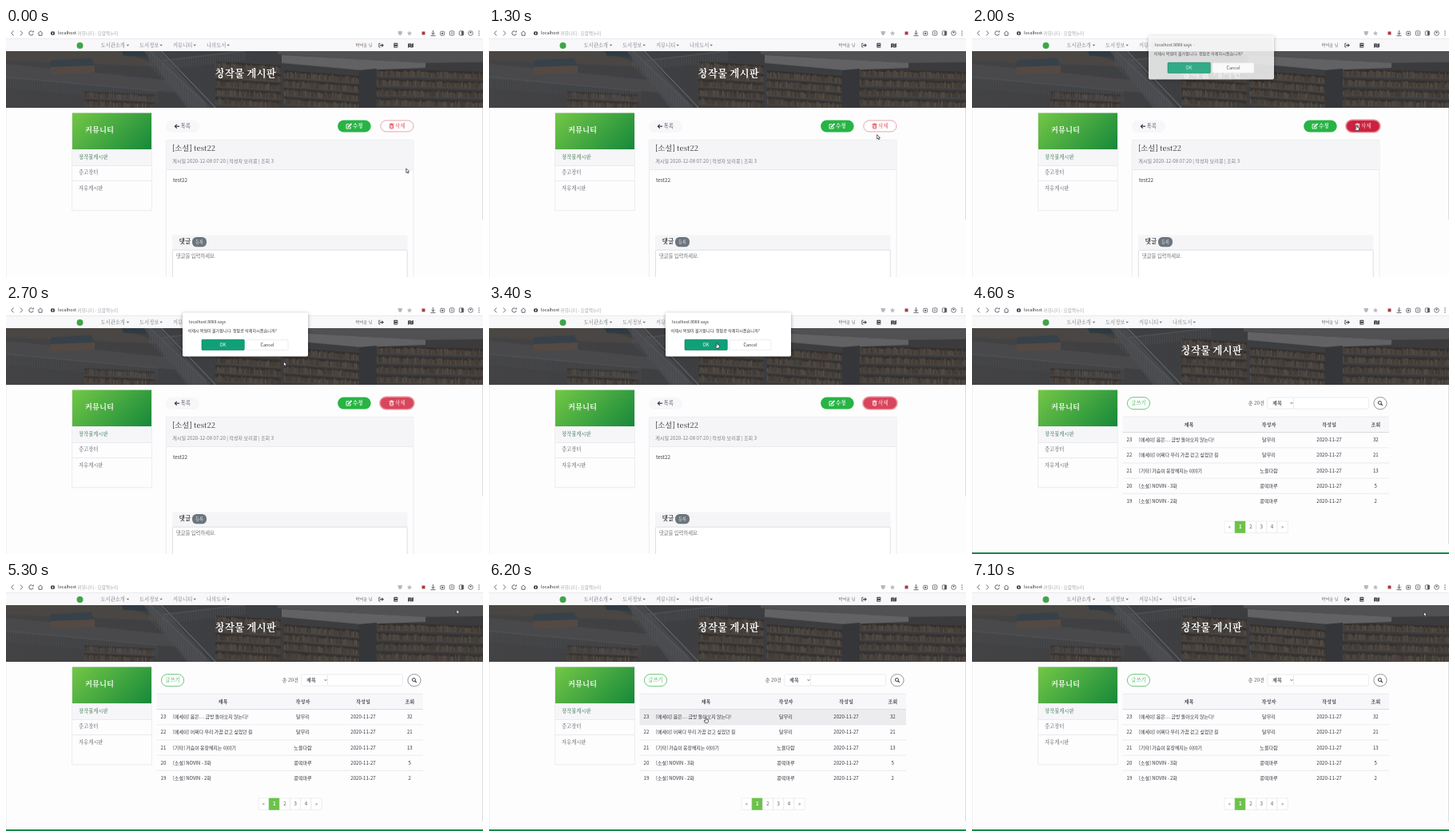
An HTML page with a canvas that plays this animation: 597 by 312 pixels, repeating every 7.2 s.

```html
<!DOCTYPE html>
<html lang="ko">
<head>
<meta charset="utf-8">
<title>커뮤니티</title>
<style>
html, body { margin: 0; width: 100%; height: 100%; overflow: hidden; background: #fff; }
canvas { display: block; width: 597px; height: 312px; }
</style>
</head>
<body>
<canvas id="stage" width="597" height="312"></canvas>
<script>
const W = 597, H = 312, LOOP = 7200, STEP = 100;
const SANS = '"Noto Sans CJK KR", "Noto Sans", sans-serif';
const SERIF = '"Noto Serif CJK KR", "Noto Serif", "Noto Sans CJK KR", serif';
const RED = '#dc3545', GREEN = '#28b445', LINE = '#e5e7ea', INK = '#30343a', PAGE = '#fdfdfe';
const screen = document.getElementById('stage').getContext('2d');
let c = screen;

// Drawing helpers
function rect(x, y, w, h, fill) {
  c.fillStyle = fill;
  c.fillRect(x, y, w, h);
}

function box(x, y, w, h, r, fill, stroke, lw = 0.8) {
  c.beginPath();
  c.roundRect(x, y, w, h, r);
  if (fill) { c.fillStyle = fill; c.fill(); }
  if (stroke) { c.strokeStyle = stroke; c.lineWidth = lw; c.stroke(); }
}

function path(points, stroke, lw = 0.9, fill) {
  c.beginPath();
  points.forEach(([x, y], i) => i ? c.lineTo(x, y) : c.moveTo(x, y));
  if (fill) { c.closePath(); c.fillStyle = fill; c.fill(); }
  if (stroke) { c.strokeStyle = stroke; c.lineWidth = lw; c.stroke(); }
}

const shape = (fill, ...points) => path(points, null, 0, fill);

function ring(x, y, r, stroke, lw = 0.9, from = 0, to = Math.PI * 2) {
  c.beginPath();
  c.arc(x, y, r, from, to);
  c.strokeStyle = stroke;
  c.lineWidth = lw;
  c.stroke();
}

function dot(x, y, r, fill) {
  c.beginPath();
  c.arc(x, y, r, 0, Math.PI * 2);
  c.fillStyle = fill;
  c.fill();
}

// y is the optical middle of the line
function text(s, x, y, size, color = INK, { font = SANS, align = 'left', weight = 400 } = {}) {
  c.font = `${weight} ${size}px ${font}`;
  c.textAlign = align;
  c.fillStyle = color;
  c.fillText(s, x, y + size * 0.36);
}

const serif = (s, x, y, size, color, opt = {}) => text(s, x, y, size, color, { font: SERIF, weight: 500, ...opt });
const mid = (s, x, y, size, color, opt = {}) => text(s, x, y, size, color, { align: 'center', ...opt });

function random(seed) {
  return () => (seed = (seed * 16807) % 2147483647) / 2147483647;
}

// Dimmed library hall behind the page title
function paintHero() {
  const rnd = random(77);
  const g = c.createLinearGradient(0, 0, W, 0);
  g.addColorStop(0, '#434345');
  g.addColorStop(0.5, '#3d3e41');
  g.addColorStop(1, '#3b3b3d');
  rect(0, 0, W, 70, g);

  const shelf = (x, y, w, h, tilt) => {
    shape('#34302e', [x, y], [x + w, y + tilt], [x + w, y + tilt + h], [x, y + h]);
    for (let i = 0; i < w; i += 2) {
      const tall = h * (0.6 + rnd() * 0.3), l = 24 + rnd() * 9;
      rect(x + i, y + tilt * i / w + h - tall, 1.5, tall, `hsl(${20 + rnd() * 15} 9% ${l}%)`);
    }
    path([[x, y + h], [x + w, y + tilt + h]], '#544c45', 0.8);
  };
  const railing = (x0, y0, x1, y1, h, color) => {
    for (let x = x0; x < x1; x += 3) {
      const y = y0 + (y1 - y0) * (x - x0) / (x1 - x0);
      path([[x, y], [x, y + h]], color, 0.6);
    }
    path([[x0, y0], [x1, y1]], color, 1);
  };

  shape('#4a4643', [0, 0], [140, 0], [200, 20], [0, 12]);
  shape('#49494b', [0, 16], [200, 36], [215, 52], [0, 34]);
  shape('#2f3a42', [145, 0], [188, 0], [190, 8], [147, 6]);
  shape('#36414a', [56, 12], [106, 9], [111, 18], [56, 20]);
  shape('#544a43', [56, 20], [111, 18], [111, 27], [56, 29]);
  for (let i = 0; i < 2; i++) shelf(98, 50 + i * 10, 88, 8, 4);
  railing(0, 32, 190, 50, 14, '#505255');

  for (let i = 0; i < 5; i++) shelf(262, 13 + i * 11, 82, 9, 5);
  for (let i = 0; i < 4; i++) shelf(348, 24 + i * 11, 94, 9, 7);
  for (let i = 0; i < 4; i++) shelf(462, 22 + i * 12, 136, 9, 4);
  shape('#515153', [340, 0], [W, 0], [W, 14], [520, 15], [340, 4]);
  shape('#626265', [345, 5], [525, 15], [525, 21], [445, 24], [345, 15]);
  shape('#35363a', [442, 24], [464, 22], [464, 70], [442, 70]);

  shape('#48494c', [172, 0], [192, 0], [256, 70], [226, 70]);
  railing(180, 0, 250, 66, 20, '#5a5d60');
  path([[194, 0], [262, 70]], '#777b7d', 1);
  railing(196, 12, 300, 0, 12, '#55585b');
}

const hero = document.createElement('canvas');
hero.width = W;
hero.height = 70;
c = hero.getContext('2d');
paintHero();
c = screen;

function caret(x, y, color) {
  shape(color, [x - 1.8, y - 1], [x + 1.8, y - 1], [x, y + 1]);
}

function browserBar(loading) {
  const k = '#55595e', pale = '#b6b9bd';
  rect(0, 0, W, 13, '#fff');
  path([[9.5, 3.5], [6.8, 6.5], [9.5, 9.5]], k);
  path([[18, 3.5], [20.7, 6.5], [18, 9.5]], k);
  if (loading) {
    path([[29, 4], [34, 9]], k);
    path([[34, 4], [29, 9]], k);
  } else {
    ring(31.5, 6.5, 2.7, k, 0.9, 0.2, 5.2);
    shape(k, [34.8, 3], [34.6, 5.6], [32.4, 5.2]);
  }
  path([[40, 6.8], [43, 3.8], [46, 6.8]], k);
  path([[41, 6.5], [41, 9.3], [45, 9.3], [45, 6.5]], k);
  dot(58.5, 6.5, 2.6, '#4a4e53');
  rect(58.1, 6, 0.9, 2.2, '#fff');
  rect(58.1, 4.6, 0.9, 0.8, '#fff');
  text('localhost', 65, 6.5, 5.4, '#333');
  text('커뮤니티 - 모람책누리', 89.5, 6.5, 5.6, '#a3a6aa');

  shape(pale, [490.5, 4], [496, 4], [495.5, 7.5], [493.2, 9.5], [491, 7.5]);
  shape(pale, ...Array.from({ length: 10 }, (_, i) => {
    const a = i * Math.PI / 5 - Math.PI / 2, r = i % 2 ? 1.5 : 3.4;
    return [505 + r * Math.cos(a), 6.7 + r * Math.sin(a)];
  }));
  if (!loading) rect(520.5, 4.5, 4, 4, '#a83a48');
  path([[534.5, 3], [534.5, 8]], k);
  path([[532.3, 6], [534.5, 8.2], [536.7, 6]], k);
  path([[531.5, 9.7], [537.5, 9.7]], k);
  box(543.7, 4.3, 5, 5, 1, null, k);
  rect(545.2, 5.8, 2, 2, k);
  box(555.3, 3.8, 5.4, 5.4, 1, null, k);
  rect(557.6, 5, 0.9, 3, k);
  box(567.3, 3.8, 5.4, 5.4, 1, null, k);
  rect(570, 4, 2.5, 5, k);
  ring(581.5, 6.5, 2.9, k, 0.8);
  dot(581.5, 5.8, 1, k);
  for (const y of [4, 6.5, 9]) dot(592, y, 0.7, k);
}

function siteHeader() {
  rect(0, 13, W, 16, '#f8f8fa');
  rect(0, 13, W, 0.7, '#e4e5e8');
  dot(92.5, 22, 4, '#3fa648');
  [['도서관소개', 118.5, 152.5], ['도서정보', 167, 194.2], ['커뮤니티', 209, 236.2], ['나의도서', 251, 278.2]]
    .forEach(([s, x, arrow]) => {
      serif(s, x, 21.5, 6.3, '#74777c');
      caret(arrow, 21.7, '#74777c');
    });
  serif('박여울 님', 437.5, 20.7, 5.1, '#5a4a48');
  const k = '#4b4f55';
  path([[468.5, 19.3], [466.8, 19.3], [466.8, 24], [468.5, 24]], k);
  path([[468, 21.7], [472, 21.7]], k, 1.3);
  shape(k, [470.3, 19.3], [473, 21.7], [470.3, 24]);
  box(485.3, 18.8, 5, 6, 0.8, k);
  rect(486.6, 20.2, 2.8, 0.7, '#fff');
  rect(486.4, 23.3, 3.5, 0.7, '#fff');
  shape(k, [503, 19.7], [505.3, 19], [507.7, 19.9], [510, 19], [510, 24], [507.7, 24.8], [505.3, 24], [503, 24.8]);
  path([[505.3, 19.2], [505.3, 24]], '#ddd', 0.4);
  path([[507.7, 20], [507.7, 24.6]], '#ddd', 0.4);
  c.drawImage(hero, 0, 28.6, W, 70.9);
  mid('창작물 게시판', 299.8, 56, 12.6, '#fff', { font: SERIF, weight: 600 });
}

function sidebar() {
  const g = c.createLinearGradient(96, 92, 168, 166);
  g.addColorStop(0, '#74c846');
  g.addColorStop(1, '#16883b');
  box(82.6, 106.4, 99.8, 122.3, 0, PAGE, LINE, 0.7);
  rect(83, 106.5, 99, 45.7, g);
  serif('커뮤니티', 99, 128, 9.3, '#fff', { weight: 600 });
  rect(83, 152.2, 99, 19.8, '#f6f6f9');
  rect(83, 172, 99, 0.8, LINE);
  rect(83, 191, 99, 0.8, LINE);
  serif('창작물게시판', 91, 162, 6.3, '#2c6a45');
  serif('중고장터', 91, 181.2, 6.3, '#55585d');
  serif('자유게시판', 91, 200.3, 6.3, '#55585d');
}

function deleteButton(state) {
  const fill = { idle: '#fff', hover: '#cb2140', held: '#d8465c', focus: '#fff' }[state];
  const ink = state === 'idle' || state === 'focus' ? RED : '#fff';
  if (state !== 'idle') box(467.9, 115, 43, 15.8, 7.9, null, '#eda0aa', 1.6);
  box(468.8, 115.9, 41.2, 14, 7, fill, state === 'idle' ? '#dd808a' : state === 'held' ? fill : RED, 0.7);
  box(480.6, 121.3, 4, 4.7, 0.6, null, ink, 0.8);
  path([[479.6, 120.6], [485.6, 120.6]], ink, 0.8);
  path([[481.6, 119.8], [483.6, 119.8]], ink, 0.8);
  path([[481.9, 122], [481.9, 125.3]], ink, 0.5);
  path([[483.3, 122], [483.3, 125.3]], ink, 0.5);
  serif('삭제', 487, 123, 6.5, ink);
}

function postPage(state) {
  box(200, 115.5, 42, 15.5, 7.7, '#f7f7fa');
  path([[211.5, 123.2], [217, 123.2]], INK, 1.2);
  path([[213.8, 120.8], [211.4, 123.2], [213.8, 125.6]], INK, 1.2);
  serif('목록', 218.5, 123, 6.4, INK);

  box(415.1, 115.5, 41.6, 15, 7.5, GREEN);
  path([[429.5, 120.7], [426, 120.7], [426, 126], [431.2, 126], [431.2, 123.7]], '#fff');
  path([[428, 124.3], [432.5, 119.8]], '#fff', 1.7);
  serif('수정', 434, 123, 6.5, '#fff', { weight: 600 });
  deleteButton(state);

  box(200.4, 140.4, 309.6, 200, 1, PAGE, LINE);
  rect(200.8, 140.8, 308.8, 36.4, '#f5f5f7');
  rect(200.8, 177, 308.8, 0.8, LINE);
  serif('[소설] test22', 208, 151, 9.4, '#2f3237', { weight: 400 });
  text('게시일 2020-12-08 07:20 | 작성자 보리콩 | 조회 3', 208.3, 167.2, 6.15, '#7c7f84');
  text('test22', 209, 190.3, 6.3, '#3c3f44');

  rect(208, 259.5, 294.5, 18.5, '#f5f5f7');
  serif('댓글', 216.5, 267.3, 7.7, INK, { weight: 600 });
  box(233, 262, 18, 12.3, 5.5, '#6c757d');
  mid('등록', 242, 268.1, 5.3, '#fff', { font: SERIF, weight: 500 });
  box(208.4, 278.2, 293.8, 60, 1, '#fff', '#d4d7dc');
  text('댓글을 입력하세요.', 213, 285.4, 6.3, '#70747a');
  rect(596, 100, 1, 140, '#dcdde0');
}

const ROWS = [
  [23, '[에세이] 봄은.... 금방 돌아오지 않는다!', '달무리', 32],
  [22, '[에세이] 어쩌다 우리 가끔 걷고 싶었던 길', '달무리', 21],
  [21, '[기타] 가슴이 웅장해지는 이야기', '노을다람', 13],
  [20, '[소설] NOVIN - 3화', '콩떡마루', 5],
  [19, '[소설] NOVIN - 2화', '콩떡마루', 2]
];
const rowTop = i => 159.8 + i * 19.1;

function listPage(pointer) {
  box(194.4, 115.6, 28.2, 15, 7.5, '#fff', '#4cb95d');
  mid('글쓰기', 208.5, 123, 6.4, '#35ad49', { font: SERIF, weight: 500 });
  serif('총 20건', 345.5, 123, 6.2);
  box(369.9, 115.9, 32.6, 14.2, 1.5, '#fff', LINE);
  serif('제목', 376, 123, 6.1, INK, { weight: 600 });
  path([[398.6, 122.2], [400, 123.6], [401.4, 122.2]], INK, 0.8);
  box(402.5, 115.9, 93.8, 14.2, 1.5, '#fff', LINE);
  box(502.9, 115.6, 16.2, 15, 7.5, '#fff', '#74787d');
  ring(510.4, 122.5, 2, INK, 1);
  path([[511.9, 124], [513.8, 125.9]], INK, 1.2);

  rect(188.5, 140, 333.5, 19.8, '#f7f7fa');
  rect(188.5, 139.7, 333.5, 0.8, LINE);
  rect(188.5, 159, 333.5, 1, '#d8dbe0');
  [['제목', 271.5], ['작성자', 371.5], ['작성일', 447], ['조회', 505.3]]
    .forEach(([s, x]) => mid(s, x, 149.8, 6.2, INK, { font: SERIF, weight: 700 }));

  ROWS.forEach(([no, title, author, views], i) => {
    const top = rowTop(i), y = top + 9.4;
    const over = pointer && pointer.x > 188 && pointer.x < 522 && pointer.y >= top && pointer.y < top + 19.1;
    if (over) rect(188.5, top, 333.5, 19.1, '#ececee');
    if (i) rect(188.5, top - 0.4, 333.5, 0.8, LINE);
    mid(no, 197, y, 6.1);
    text(title, 209, y, 5.95);
    mid(author, 371.5, y, 6.1);
    mid('2020-11-27', 447, y, 6.1);
    mid(views, 505.3, y, 6.1);
  });

  ['«', '1', '2', '3', '4', '»'].forEach((s, i) => {
    const x = 316 + i * 13.2, on = i === 1;
    box(x, 271, 13.2, 14.4, 0, on ? '#6cc24a' : '#fff', on ? '#6cc24a' : LINE, 0.7);
    mid(s, x + 6.6, 278.2, 6.2, on ? '#fff' : '#555a60', { weight: on ? 700 : 400 });
  });
  rect(0, 310, W, 2, '#148a49');
  rect(596, 100, 1, 200, '#dcdde0');
}

function dialog(alpha) {
  c.save();
  c.globalAlpha = alpha;
  c.shadowColor = 'rgba(0,0,0,.35)';
  c.shadowBlur = 4;
  c.shadowOffsetY = 1;
  box(221, 9.5, 157, 55, 2, '#fff');
  c.shadowColor = 'transparent';
  text('localhost:8088 says', 229, 21.3, 5.1, '#34373b');
  text('삭제시 복원이 불가합니다. 정말로 삭제하시겠습니까?', 227.5, 32.5, 5.1, '#34373b');
  box(245, 43.3, 53.3, 13.2, 1, '#10a078', '#087a5a', 0.6);
  mid('OK', 271.5, 50, 5.6, '#fff');
  box(301, 43.7, 52, 12.6, 1, '#fff', '#e3e5e8', 0.7);
  mid('Cancel', 327, 50, 5.5, '#3b3f44');
  c.restore();
}

const ARROW = [[0, 0], [0, 5.4], [1.3, 4.3], [2.1, 6.2], [3, 5.8], [2.2, 4], [3.8, 3.9], [0, 0]];
const HAND = [[-0.6, 0], [0.5, 0], [0.6, 2.2], [3, 2.9], [2.8, 5.2], [2, 6.6], [-0.8, 6.6], [-2.4, 4], [-1.9, 3.4], [-0.7, 4.2], [-0.6, 0]];

function drawPointer({ x, y, hand }) {
  c.save();
  c.translate(x, y);
  c.lineJoin = 'round';
  path(hand ? HAND : ARROW, '#2a2a2c', 0.7, '#fff');
  c.restore();
}

// [start, end, from x, from y, to x, to y]
const MOVES = [
  [600, 1600, 500.8, 176, 481.5, 122],
  [2200, 3000, 481.5, 122, 285.5, 47.5],
  [4600, 5200, 430, 96, 564, 34.5],
  [5400, 6100, 564, 34.5, 271.5, 170],
  [6200, 6900, 271.5, 170, 565.5, 37.5]
];

function pointerAt(t) {
  if (t >= 3700 && t < 4700) return null;
  const [a, b, x0, y0, x1, y1] = MOVES.filter(m => t >= m[0]).pop() || MOVES[0];
  const p = Math.min(1, Math.max(0, (t - a) / (b - a)));
  const e = p * p * (3 - 2 * p);
  const x = x0 + (x1 - x0) * e, y = y0 + (y1 - y0) * e;
  const onDelete = t < 2300 && x < 510 && y > 115 && y < 131;
  const onOk = t > 2300 && t < 3700 && x < 298 && y < 57;
  const onRow = t > 5400 && x < 522 && y > 160;
  return { x, y, hand: onDelete || onOk || onRow };
}

function dialogAlpha(t) {
  if (t < 1900 || t >= 3700) return 0;
  if (t >= 3600) return 0.5;
  return t < 2000 ? 0.4 : t < 2100 ? 0.83 : 1;
}

function buttonState(t) {
  if (t < 1500) return 'idle';
  if (t < 2200) return 'hover';
  return t < 3700 ? 'held' : 'focus';
}

function draw(now) {
  const t = Math.floor((now % LOOP) / STEP) * STEP;
  const pointer = pointerAt(t);
  rect(0, 0, W, H, PAGE);
  browserBar(t >= 3700 && t < 4600);
  siteHeader();
  sidebar();
  rect(0, 100, 0.8, H - 100, '#ececef');
  if (t < 4500) postPage(buttonState(t));
  else listPage(pointer);
  const alpha = dialogAlpha(t);
  if (alpha) dialog(alpha);
  if (pointer) drawPointer(pointer);
}

const start = performance.now();
function tick() {
  draw(performance.now() - start);
  requestAnimationFrame(tick);
}
tick();
</script>
</body>
</html>
```
